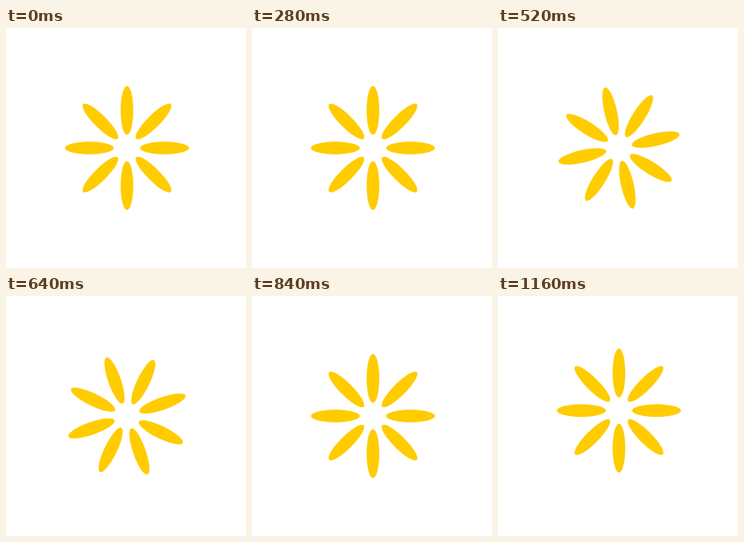
Write an HTML page that moves like this. It is 300 px wide and 300 px high and loops after 1.2 s.

```html
<!DOCTYPE html>
<html lang="en">
<head>
<meta charset="utf-8">
<title>Petal spinner</title>
<style>
  html, body { margin: 0; width: 100%; height: 100%; overflow: hidden; background: #fff; }
  svg { display: block; width: 100%; height: 100%; }
</style>
</head>
<body>
<svg viewBox="0 0 300 300" fill="#fc0"><g id="flower"></g></svg>
<script>
  const STEP = 40, STEPS = 30, TURN = 28, PETALS = 8;
  const flower = document.getElementById('flower');

  for (let i = 0; i < PETALS; i++) {
    const petal = document.createElementNS('http://www.w3.org/2000/svg', 'ellipse');
    petal.setAttribute('cy', -47);
    petal.setAttribute('rx', 7.9);
    petal.setAttribute('ry', 30.6);
    petal.setAttribute('transform', `rotate(${i * 360 / PETALS})`);
    flower.append(petal);
  }

  // One stepped turn, then a short hop upwards before the loop restarts
  function draw(time) {
    const step = Math.floor(time / STEP) % STEPS;
    const y = step > TURN ? 143.2 : 150;
    const angle = Math.min(step, TURN) * 360 / TURN;
    flower.setAttribute('transform', `translate(151.2 ${y}) rotate(${angle})`);
  }

  let start;
  function tick(now) {
    start ??= now;
    draw(now - start);
    requestAnimationFrame(tick);
  }
  draw(0);
  requestAnimationFrame(tick);
</script>
</body>
</html>
```
